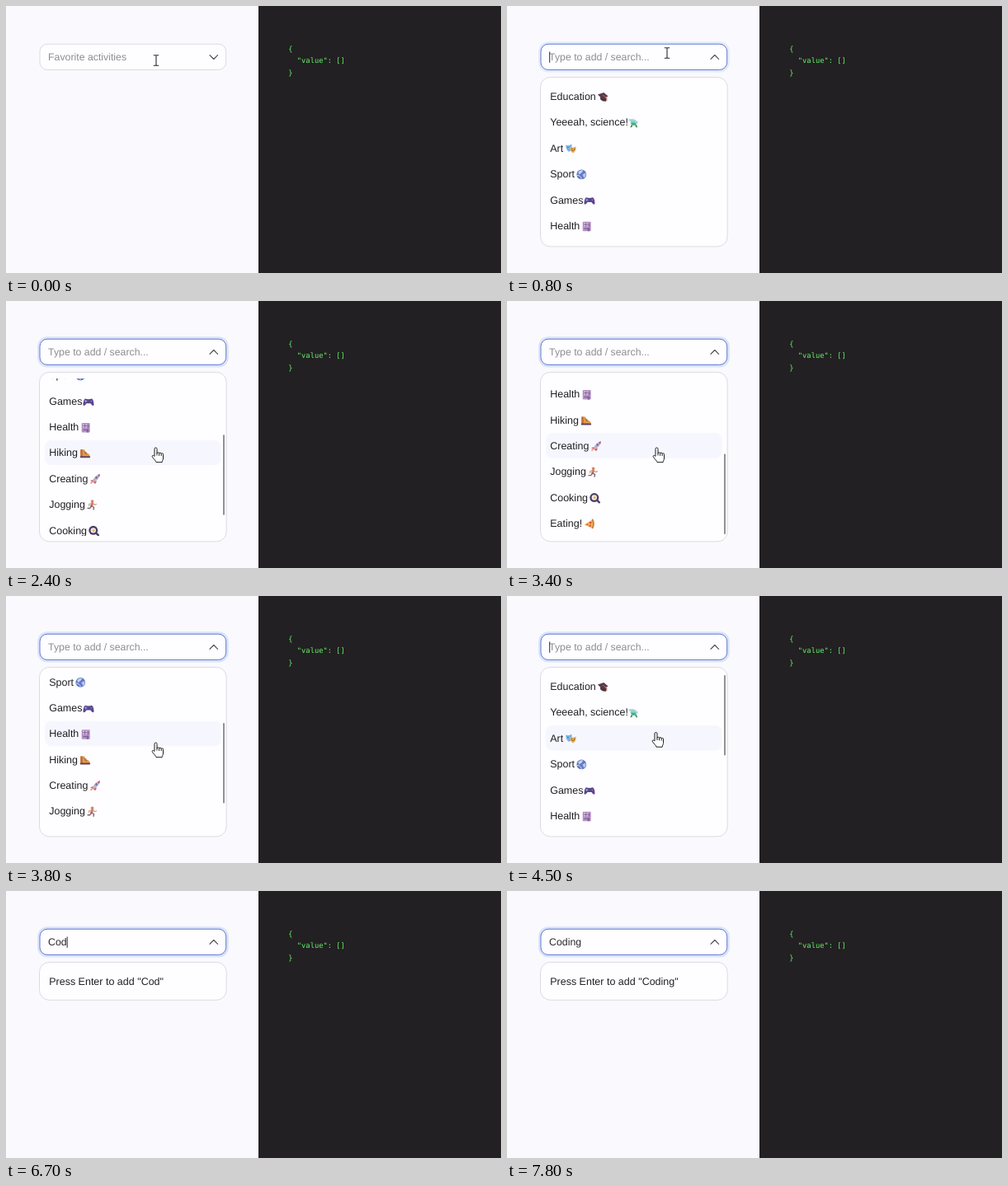
Animation, 600 px wide and 324 px high, one loop 8000 ms. Source, as an HTML page:

```html
<!DOCTYPE html>
<html lang="en">
<head>
<meta charset="utf-8">
<title>Tag select</title>
<style>
  html, body { margin: 0; width: 100%; height: 100%; overflow: hidden; background: #faf9fd; }
  svg { display: block; width: 600px; height: 324px; }
  text { white-space: pre; text-rendering: geometricPrecision; }
  .field { font: 12.3px "Liberation Sans", Arial, sans-serif; fill: #2b2b2e; }
  .hint { fill: #8e8d91; }
  .row { font: 12.5px "Liberation Sans", Arial, sans-serif; fill: #202023; }
  .json { font: 8.75px "DejaVu Sans Mono", monospace; fill: #66f06a; }
</style>
</head>
<body>
<svg viewBox="0 0 600 324">
  <defs><clipPath id="view"><rect x="41" y="94" width="226" height="191"/></clipPath></defs>
  <rect width="600" height="324" fill="#faf9fd"/>
  <rect x="306" width="294" height="324" fill="#222022"/>
  <g class="json">
    <text x="342.3" y="54.6">{</text>
    <text x="342.3" y="69.4">  "value": []</text>
    <text x="342.3" y="84.2">}</text>
  </g>
  <g id="ui"></g>
</svg>
<script>
const LOOP = 8000, STEP = 100;
const ROW = 31.36, TOP = 94, VIEW = 191, MAX_SCROLL = 153.6;

const shape = (d, fill) => `<path d="${d}" fill="${fill}"/>`;
const line = (d, color, width = 1) =>
  `<path d="${d}" fill="none" stroke="${color}" stroke-width="${width}" stroke-linecap="round" stroke-linejoin="round"/>`;
const dot = (x, y, r, fill) => `<circle cx="${x}" cy="${y}" r="${r}" fill="${fill}"/>`;
const box = (x, y, w, h, r, attrs) =>
  `<rect x="${x}" y="${y}" width="${w}" height="${h}" rx="${r}" ${attrs}/>`;

// Icons are drawn around their own centre, about 12px wide.
const items = [
  { label: 'Education', x: 116.3, icon:
    shape('M-3.5 0L4 1V5Q0 6-3 3Z', '#4a3442') + shape('M-6.3-3L1-5.5L6.3-1L-.5 2.5Z', '#58394f') +
    line('M0-2L4.5 1V4', '#b5654f') },
  { label: 'Yeeeah, science!', x: 153.3, icon:
    shape('M-4 5.5L-2 1H3L5 5.5H3L2 3H-1L-2 5.5Z', '#3f8f62') + dot(0, -.5, 3.6, '#7fd0c9') +
    shape('M-5.5-4.5H0L5.5-1L5 1L0-2H-5Z', '#9fd3dc') + shape('M-3 0H3Q2 3 0 3T-3 0Z', '#48ad72') },
  { label: 'Art', x: 77.3, icon:
    shape('M-6-4.5Q-2-3 1-5.5L1.5 0Q0 4-3 3.5Q-6 1-6-4.5Z', '#72b5e8') +
    shape('M-1-2Q3-.5 6.3-2.5Q7 3 3 5.5Q-1 4-1-2Z', '#f0b04e') +
    line('M1 2Q3 4 4.5 1.5M1 .3H2M4 .3H5M-4-1.5H-3', '#7b5039', .8) },
  { label: 'Sport', x: 90.3, icon:
    dot(0, 0, 5.9, '#6479c4') + shape('M-4-3Q-1-6 2-5L0-2L-3 0Z', '#c6d6f4') +
    shape('M1 0L5-2Q6 2 3 4Z', '#b8c8ee') + line('M-5 1Q-1 1 0 5', '#d8e1f8') },
  { label: 'Games', x: 100, icon:
    shape('M-4-3.5Q0-2.3 4-3.5Q6.5-2 6.5 4.5Q4.5 6 2.5 2.3H-2.5Q-4.5 6-6.5 4.5Q-6.5-2-4-3.5Z', '#55478f') +
    line('M-4.5-.5H-2M-3.2-1.8V.8', '#b9aee2', .8) + dot(3.5, -.5, 1.1, '#a45d9e') },
  { label: 'Health', x: 96.7, icon:
    box(-5, -5.5, 10, 11.5, 1, 'fill="#b592c4"') + box(-3, -4, 4, 4, 0, 'fill="#ead9ef"') +
    line('M-1-4V0M-3-2H1M3-3V0M-3 3H3', '#79588f') + box(1, 2, 2.5, 4, 0, 'fill="#80629b"') },
  { label: 'Hiking', x: 95.8, icon:
    shape('M-5.5-4.5H-.5L0-1Q6 0 6 4H-5.5Z', '#e79a45') + shape('M-5.5-4.5H-3V4H-5.5Z', '#bb6e3e') +
    box(-6, 3.5, 12.3, 2, .8, 'fill="#5a415d"') + line('M-1-2L1.5-1M0 0L2 .8', '#7a4634', .8) },
  { label: 'Creating', x: 108, icon:
    shape('M-3 1L-6 2L-2 4L0 6L2 3Z', '#dd526d') + shape('M-3 2Q0-5 6-6Q5 0-1 4Z', '#b8b3cc') +
    shape('M3-5L6-6L5-2Z', '#dc4f69') + dot(1.6, -1.8, 1.2, '#586eb0') + line('M-5 5L-3 3', '#f09b75', 1.6) },
  { label: 'Jogging', x: 104.6, icon:
    dot(0, -4.4, 1.8, '#c88d67') + line('M0-2L-1 1', '#d96f6a', 3) +
    line('M-1 1L2 3L1.5 5.5M-1 1.5L-3 4L-5.5 4', '#7b6a76', 1.4) +
    line('M-1-2L-4-1L-4 1M1-2L3 0L5-1', '#d9a17e', 1.2) },
  { label: 'Cooking', x: 106.5, icon:
    line('M3 3L5.3 5.3', '#493e64', 2.4) + dot(-.7, -.5, 5.5, '#493e64') +
    dot(-.7, -.5, 3.2, '#efe9f1') + dot(-.3, -.4, 1.5, '#e9b64d') },
  { label: 'Eating!', x: 99.7, icon:
    shape('M-6 1L4-5.5Q7 0 4 5.5Z', '#f3b557') + line('M4-5Q6.5 0 4 5', '#c87c43', 1.8) +
    dot(1.5, -1.3, 1.4, '#d7574b') + dot(1, 2.4, 1.2, '#d7574b') + dot(-2.3, .8, 1, '#d7574b') }
];

const typing = [[0, ''], [5600, 'C'], [6200, 'Co'], [6700, 'Cod'], [7000, 'Codi'], [7300, 'Codin'], [7500, 'Coding']];
const caretSteps = [[0, 0], [700, 1], [1200, 0], [1800, 1], [2300, 0], [2900, 1], [3400, 0], [4000, 1],
  [4600, 0], [5100, 1], [7800, 0]];
const pointerSteps = [
  [0, 'beam', 182, 66], [100, 'beam', 183, 63], [200, 'beam', 184, 60.5], [400, 'beam', 194, 57],
  [2000, 'hand', 188, 108], [2100, 'hand', 185, 140], [2200, 'hand', 182.5, 170],
  [2300, 'hand', 182, 175], [2400, 'hand', 181.5, 178], [4500, 'hand', 180.5, 165.5], [5600, 'none', 180.5, 165.5]
];
const at = (steps, t) => steps.findLast(step => step[0] <= t).slice(1);
const clamp = v => Math.min(1, Math.max(0, v));
const ease = v => { v = clamp(v); return v * v * (3 - 2 * v); };

const pen = document.createElement('canvas').getContext('2d');
pen.font = '12.3px "Liberation Sans", Arial, sans-serif';

const cursors = {
  none: '',
  beam: line('M-2.8-6.3H-.8L0-5.6L.8-6.3H2.8M0-5.6V5.6M-2.8 6.3H-.8L0 5.6L.8 6.3H2.8', '#29292b', 1.1),
  hand: '<path d="M-1.5 10.5V1.5a1.5 1.5 0 0 1 3 0V7a1.3 1.3 0 0 1 2.6.2a1.3 1.3 0 0 1 2.6.5a1.2 1.2 0 0 1 2.3.7V13' +
    'C9 15 7.7 15.5 7.7 17.7H.5C.3 15.8-2 14.5-4.1 11.3C-5 9.6-3.3 8.6-1.5 10.5ZM1.5 7V9.5M4.1 7.4V9.8M6.7 7.8V10"' +
    ' fill="#fff" stroke="#1d1d1f" stroke-width="1" stroke-linejoin="round"/>'
};

function drawField(t, query, focus, open) {
  const active = t >= 700;
  const hint = active ? 'Type to add / search...' : 'Favorite activities';
  const caretX = query ? 51.6 + pen.measureText(query).width : 51.7;
  return (active ? box(38.2, 43.2, 231.6, 37.4, 12, `fill="#d9e3fa" opacity="${focus}"`) : '') +
    box(41, 46.2, 225.7, 31.2, 9, `fill="#fefdff" stroke="${active ? '#6279cb' : '#dcdbe0'}"`) +
    `<text class="field ${query ? '' : 'hint'}" x="51.1" y="66.4">${query || hint}</text>` +
    (at(caretSteps, t)[0] ? box(caretX - .5, 55.5, 1, 13.3, 0, 'fill="#29292b"') : '') +
    `<g transform="rotate(${-180 * open} 251.8 62)">${line('M247 59.6L251.8 64.5L256.6 59.6', '#47474b', 1.1)}</g>`;
}

function drawPanel(t, query, open, pointerY) {
  const matches = items.filter(item => item.label.toLowerCase().includes(query.toLowerCase()));
  const rows = query ? [{ label: `Press Enter to add "${query}"`, icon: '' }, ...matches] : matches;
  const shown = Math.min(rows.length * ROW, VIEW);
  const scrolls = rows.length * ROW > VIEW;
  const progress = ease((t - 2200) / 300) - ease((t - 3600) / 500);
  const scroll = scrolls ? MAX_SCROLL * progress : 0;
  const hovered = pointerY > TOP ? Math.floor((pointerY - TOP + scroll) / ROW) : -1;
  const list = rows.map((row, i) => {
    const y = TOP + i * ROW - scroll, middle = y + ROW / 2;
    return (i === hovered ? box(47, y + .4, 213.7, 30.5, 8, 'fill="#f6f7fe"') : '') +
      `<text class="row" x="52.2" y="${middle + 4.4}">${row.label}</text>` +
      `<g transform="translate(${row.x || 0} ${middle + .7})">${row.icon}</g>`;
  }).join('');
  const thumb = scrolls && hovered >= 0 ? box(263.2, 96 + 89.5 * progress, 1.6, 97.5, .8, 'fill="#77767a"') : '';
  const height = scrolls ? 205.5 : shown + 14.6;
  return `<g opacity="${open}">` + box(40.5, 86.4, 226.7, height, 12, 'fill="#fefdff" stroke="#dcdbe1"') +
    `<g clip-path="url(#view)">${list}</g>${thumb}</g>`;
}

function draw(t) {
  const [query] = at(typing, t);
  const [cursor, x, y] = at(pointerSteps, t);
  const open = clamp((t - 600) / 200), focus = clamp((t - 600) / 300);
  return drawField(t, query, focus, open) +
    (open ? drawPanel(t, query, open, y) : '') +
    `<g transform="translate(${x} ${y})">${cursors[cursor]}</g>`;
}

const ui = document.getElementById('ui');
const start = performance.now();
let last = -1;
function tick() {
  const t = Math.floor(((performance.now() - start) % LOOP) / STEP) * STEP;
  if (t !== last) ui.innerHTML = draw(last = t);
  requestAnimationFrame(tick);
}
tick();
</script>
</body>
</html>
```
